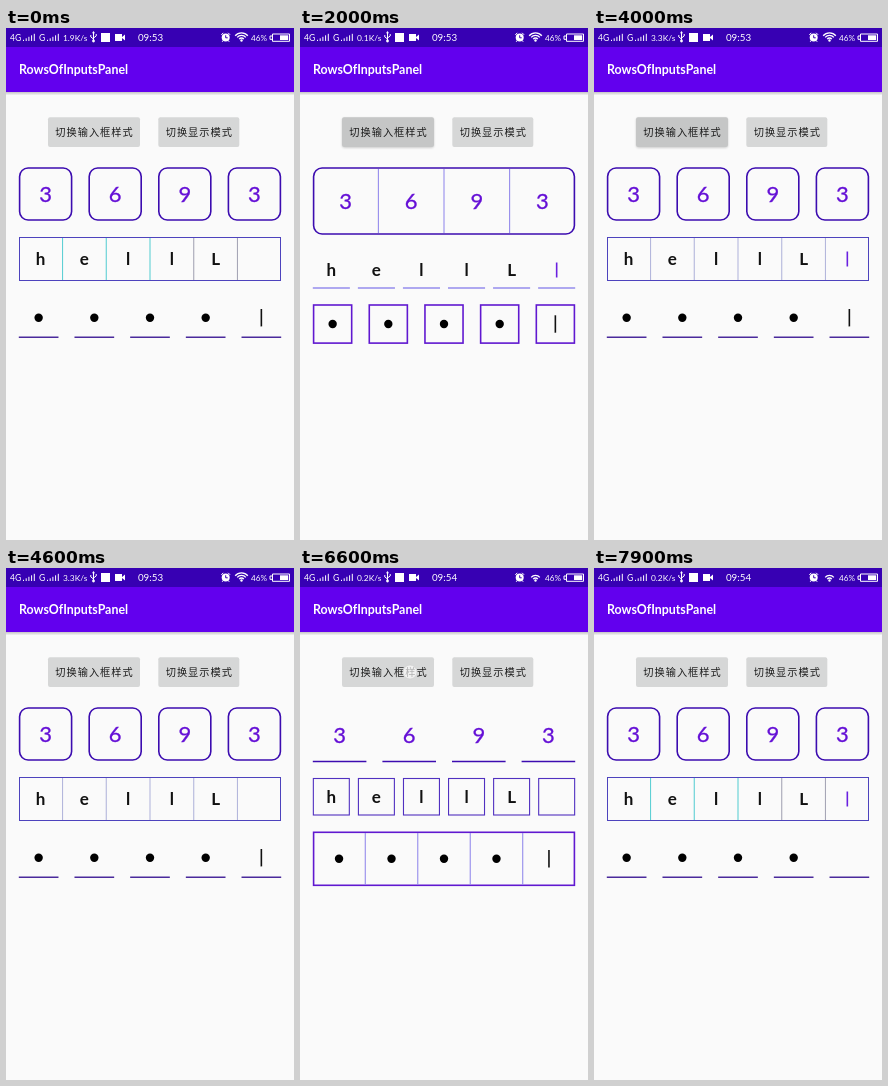
Recreate the animation shown at these times as an HTML page. Size 288 by 512 pixels, loop 8 s.

```html
<!DOCTYPE html>
<html lang="zh">
<meta charset="utf-8">
<style>
html, body { margin: 0; height: 100%; overflow: hidden; background: #fafafa; }
svg { display: block; width: 100vw; height: 100vh; font-family: Lato, "Noto Sans CJK SC", sans-serif; }
.mid { text-anchor: middle; }
.bold { font-weight: 700; }
</style>
<svg id="stage" viewBox="0 0 288 512"></svg>
<script>
const LOOP = 8000;
const PRESSES = [ // time of the click, touch x and y
  [1800, 104, 101], [2900, 102, 98], [3800, 103, 101],
  [4900, 107, 102], [5900, 108, 103], [6800, 110, 104]];

const line = (x1, y1, x2, y2, color, w = 1.6, cls = '') =>
  `<path class="${cls}" d="M${x1} ${y1}L${x2} ${y2}" stroke="${color}" stroke-width="${w}"/>`;
const box = (x, y, w, h, color, sw = 1.6, r = 0) =>
  `<rect x="${x}" y="${y}" width="${w}" height="${h}" rx="${r}" fill="none" stroke="${color}" stroke-width="${sw}"/>`;
const text = (x, y, size, color, s, extra = '') =>
  `<text x="${x}" y="${y}" font-size="${size}" fill="${color}" ${extra}>${s}</text>`;
const each = (n, f) => Array.from({ length: n }, (_, i) => f(i)).join('');

// All rows span the same width; a row has n cells with a gap between them
const LEFT = 12.8, WIDTH = 262.4;
const cells = (n, gap = 0) => {
  const w = (WIDTH - gap * (n - 1)) / n;
  const x = i => LEFT + i * (w + gap);
  return { n, w, x, mid: i => x(i) + w / 2 };
};
const boxes = (c, y, h, color, sw, r) =>
  each(c.n, i => box(c.x(i) + sw / 2, y, c.w - sw, h, color, sw, r));
const underlines = (c, y, color, w) => each(c.n, i => line(c.x(i), y, c.x(i) + c.w, y, color, w));
const dividers = (c, y1, y2, color, cls) =>
  each(c.n - 1, i => line(c.x(i + 1), y1, c.x(i + 1), y2, color, 1.1, cls));

const digits = (c, y) => each(4, i =>
  text(c.mid(i), y + 7.8, 22, '#6510d6', '3693'[i], 'class="mid" stroke="#6510d6" stroke-width=".3"'));
const letters = (c, y) => each(5, i => text(c.mid(i), y + 6, 17, '#111', 'hellL'[i], 'class="mid bold"'))
  + line(c.mid(5), y - 7.5, c.mid(5), y + 7.5, '#6a20e0', 1.6, 'caretA');
const dots = (c, y) => each(4, i => `<circle cx="${c.mid(i)}" cy="${y}" r="4.2"/>`)
  + line(c.mid(4), y - 8.7, c.mid(4), y + 8.7, '#111', 1.6, 'caretB');

const DARK = '#3c0cb0', VIOLET = '#6018d0', PALE = '#958cec';
const four = cells(4), fourApart = cells(4, 16);
const six = cells(6), sixApart = cells(6, 8);
const five = cells(5), fiveApart = cells(5, 16);
const styles = [
  boxes(fourApart, 140, 52, DARK, 1.6, 8.5) + digits(fourApart, 166.5)
  + box(13.5, 209.5, 261, 43, '#4d43bd', 1) + dividers(six, 210, 252, '#a6a6b6', 'divider') + letters(six, 231)
  + underlines(fiveApart, 309.2, '#4a2a9c', 1.5) + dots(fiveApart, 289.7),

  box(13.6, 140, 260.8, 66, DARK, 1.6, 8.5) + dividers(four, 141, 205, PALE) + digits(four, 173)
  + underlines(sixApart, 260, PALE, 1.5) + letters(sixApart, 242)
  + boxes(fiveApart, 277, 38.1, VIOLET, 1.6, 0) + dots(fiveApart, 296),

  underlines(fourApart, 193.5, DARK, 1.6) + digits(fourApart, 167)
  + boxes(sixApart, 210.5, 36.5, '#5030c0', 1.1, 0) + letters(sixApart, 229)
  + box(13.6, 264.3, 260.8, 53, VIOLET) + dividers(five, 265, 317, PALE) + dots(five, 290.8)
];

const W = '#fff';
const bars = x => each(5, i => line(x + i * 2.7, 13, x + i * 2.7, 11.8 - i * 1.5, W, 1));
const arc = (r, id = '') => {
  const s = r * .77, h = r * .64;
  return `<path ${id} d="M${235.5 - s} ${13 - h}A${r} ${r} 0 0 1 ${235.5 + s} ${13 - h}" fill="none" stroke="#fff" stroke-width="1.3"/>`;
};
const statusBar = `<path d="M0 0H288V19H0z" fill="#3700b3"/>`
  + text(4, 12.5, 8.5, W, '4G') + bars(17.5) + text(33, 12.5, 8.5, W, 'G') + bars(41.5)
  + text(57, 12.5, 8.4, W, '', 'id="speed"')
  + line(87.5, 4.5, 87.5, 13, W, 1) + `<path d="M84.8 7v2l2.7 2M90.2 6v2l-2.7 2" fill="none" stroke="#fff"/>`
  + `<path d="M87.5 3l-1.5 2.2h3z" fill="#fff"/><circle cx="87.5" cy="13" r="1.4" fill="#fff"/>`
  + `<path d="M95 5h9v9h-9zM109 6h7v7h-7zM116 9l3-2.5v6l-3-2.5z" fill="#fff"/>`
  + text(144.5, 13, 9.8, W, '', 'id="clock" class="mid"')
  + `<circle cx="219.7" cy="9.6" r="4" fill="#fff"/>`
  + `<path d="M219.7 7.3v2.5h2" fill="none" stroke="#3700b3"/>`
  + `<path d="M215.3 6.8l2-2M224.1 6.8l-2-2M217.2 12.5l-1 1.3M222.2 12.5l1 1.3" stroke="#fff"/>`
  + arc(8.2, 'id="outer"') + arc(5.6) + arc(3) + `<circle cx="235.5" cy="12.5" r="1.2" fill="#fff"/>`
  + text(245, 12.7, 8.2, W, '46%')
  + `<path d="M266.5 6H283.5V13.3H266.5zM264 8h2.5v3.3H264z" fill="none" stroke="#fff"/>`
  + `<path d="M274 7.3h8.2V12H274z" fill="#fff"/>`;

const button = (x, w, label) =>
  `<rect x="${x}" y="89.3" width="${w}" height="29.7" rx="2" fill="#d6d7d7"/>`
  + text(x + w / 2 + .5, 107.5, 10.2, '#1c1c1c', label, 'class="mid" font-weight="500" letter-spacing="1"');

stage.innerHTML = `<defs>
    <linearGradient id="shade" x2="0" y2="1"><stop stop-color="#c4c4c4"/><stop offset="1" stop-color="#fafafa"/></linearGradient>
    <clipPath id="clip"><rect x="42" y="89.3" width="92" height="29.7" rx="2"/></clipPath>
  </defs>
  <path d="M0 0H288V512H0z" fill="#fafafa"/>
  <path d="M0 64H288V67.5H0z" fill="url(#shade)"/>
  <path d="M0 19H288V64H0z" fill="#6200ee"/>`
  + statusBar + text(13, 46.3, 12.4, W, 'RowsOfInputsPanel', 'class="bold"')
  + `<rect id="lift" x="42" y="90" width="92" height="30" rx="3" style="filter:blur(1px)"/>`
  + button(42, 92, '切换输入框样式') + button(152.3, 81, '切换显示模式')
  + `<g clip-path="url(#clip)"><circle id="ripple"/></g>
     <circle id="touch" r="7" fill="#fff" fill-opacity=".65" stroke="#ccc" stroke-width=".6"/>`
  + styles.map(s => `<g class="style">${s}</g>`).join('');

const $ = id => document.getElementById(id);
const all = cls => [...document.getElementsByClassName(cls)];
const groups = all('style'), caretsA = all('caretA'), caretsB = all('caretB'), tinted = all('divider');
const show = (el, on) => { el.style.display = on ? '' : 'none'; };
const clamp = v => Math.max(0, Math.min(1, v));

function draw(t) {
  const clicks = PRESSES.filter(p => p[0] <= t).length;
  groups.forEach((g, i) => show(g, i === clicks % 3));
  tinted.forEach((d, i) => d.setAttribute('stroke',
    clicks === 3 ? '#b4b7dc' : i < 3 ? '#5fd0d4' : '#a6a6b6'));

  const blinkA = t % 1040 >= 520, blinkB = (t + 40) % 2000 < 1000;
  caretsA.forEach(c => show(c, blinkA));
  caretsB.forEach(c => show(c, blinkB));

  $('speed').textContent = (t < 900 ? '1.9' : t < 3500 ? '0.1' : t < 6100 ? '3.3' : '0.2') + 'K/s';
  $('clock').textContent = t < 4800 ? '09:53' : '09:54';
  show($('outer'), t < 6100);

  const press = PRESSES.find(p => t >= p[0] - 210 && t < p[0] + 500);
  const since = press ? t - press[0] : 500;
  const fade = clamp((500 - since) / 300);
  show($('touch'), since < 140);
  if (press) {
    for (const el of [$('touch'), $('ripple')]) {
      el.setAttribute('cx', press[1]);
      el.setAttribute('cy', press[2]);
    }
  }
  $('ripple').setAttribute('r', 21 * Math.max(0, (since + 150) / 250) ** 3.6);
  $('ripple').setAttribute('opacity', .08 * fade);
  $('lift').setAttribute('opacity', .18 * fade * clamp((since + 190) / 150));
}

const start = performance.now();
function tick() {
  draw((performance.now() - start) % LOOP);
  requestAnimationFrame(tick);
}
tick();
</script>
</html>
```
